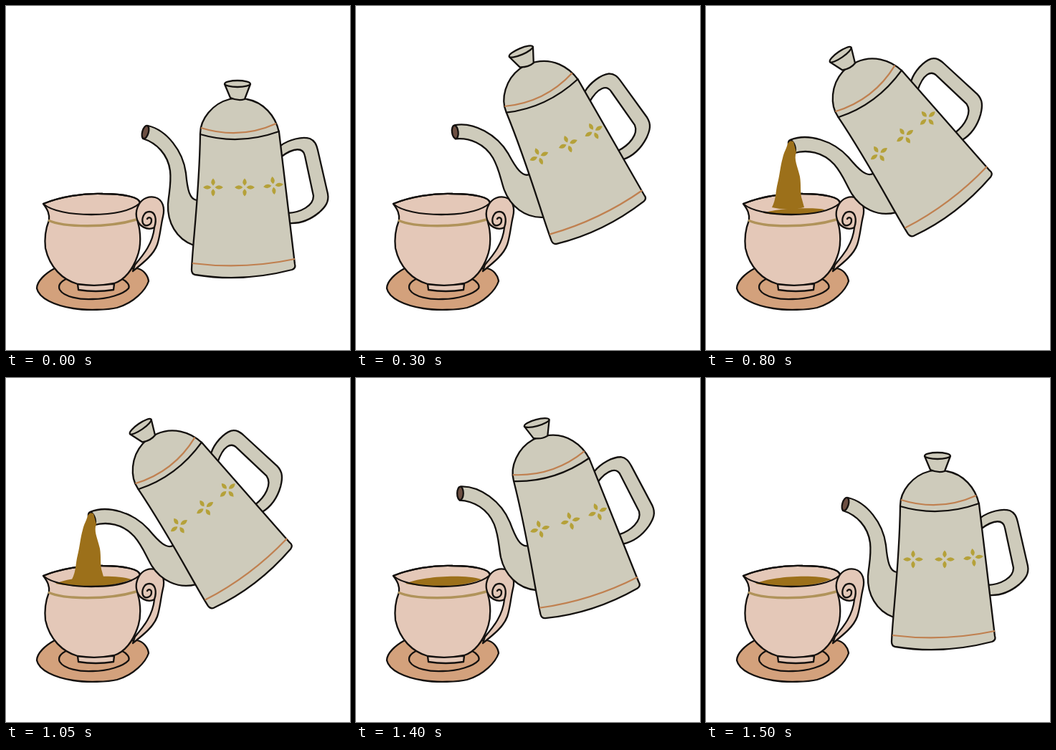
An HTML page for the animation above (2000 ms loop, 480x480 px).

```html
<!DOCTYPE html>
<html lang="en">
<head>
<meta charset="utf-8">
<title>Pouring tea</title>
<style>
  html, body { margin: 0; width: 100%; height: 100%; overflow: hidden; background: #fff; }
  svg { display: block; width: 100vw; height: 100vh; }
  .ink { stroke: #14110f; stroke-width: 2.3; stroke-linecap: round; stroke-linejoin: round; }
  .line { fill: none; }
  .pink { fill: #e4c8b8; }
  .clay { fill: #d3a17c; }
  .grey { fill: #cecbbb; }
  .trim { fill: none; stroke: #c08050; stroke-width: 2.2; }
  .tea { fill: #9c701a; }
</style>
</head>
<body>
<svg viewBox="0 0 480 480">
  <defs>
    <path id="petal" d="M2.5 0Q8 -5.5 14 0Q8 5.5 2.5 0Z"/>
    <g id="flower" fill="#b5a139">
      <use href="#petal"/>
      <use href="#petal" transform="rotate(90) scale(.9 1)"/>
      <use href="#petal" transform="rotate(180)"/>
      <use href="#petal" transform="rotate(270) scale(.9 1)"/>
    </g>
  </defs>

  <g class="ink">
    <path class="clay" d="M68 366C55 373 43 384 43 394C46 408 68 418 94 422C112 425 143 424 155 421C179 414 195 396 199 384C198 376 192 368 183 366Z"/>
    <path class="clay" d="M86 380C76 384 72 390 75 396C81 406 103 410 121 409C142 409 164 402 171 394C173 390 169 384 162 381"/>
    <path class="pink" d="M100 388L101 396Q125 400 150 396L151 388Z"/>
    <path class="pink" d="M52 276C76 266 108 261 135 262C165 262 187 267 187 275C186 287 182 292 184 302C188 315 189 335 183 350C177 367 166 382 151 387Q126 392 100 388C79 382 61 365 55 338C53 320 56 309 60 299C61 290 58 284 52 276Z"/>
  </g>
  <path fill="none" stroke="#b0935a" stroke-width="3.5" d="M59 299C80 309 142 310 182 298"/>
  <path id="surface" class="tea"/>
  <g class="ink">
    <path class="line" d="M52 276C76 266 108 261 135 262C165 262 187 267 187 275C173 287 145 291 119 291C90 291 63 286 52 276Z"/>
    <path class="pink" d="M186 276C191 268 200 265 208 267C219 270 222 282 219 294C216 306 215 322 211 333C206 347 192 358 177 370L180 361C192 347 205 331 207 309C198 314 184 308 182 294C181 288 183 281 186 276Z"/>
    <path class="line" d="M207 309C211 297 208 287 200 287C192 287 189 297 191 303C194 309 203 306 203 299C203 295 199 294 197 297"/>
  </g>

  <g id="pot">
    <g class="ink grey">
      <path d="M383 195C395 186 413 182 424 185C431 188 433 193 435 201L449 262C451 273 446 280 437 288C425 298 412 304 395 303L393 289C411 288 429 279 429 265L417 209C415 198 403 196 383 211Z"/>
      <path d="M198 167C224 173 247 202 251 233C253 255 256 272 268 271L262 334C237 325 225 301 226 277C227 262 231 248 229 230C226 207 210 191 191 185Z"/>
      <ellipse cx="194.5" cy="176" rx="4.3" ry="9.3" fill="#6d4f42" transform="rotate(16 194.5 176)"/>
      <path d="M271 178C271 158 288 136 312 130Q325 127 336 130C359 134 376 153 381 176L403 360Q405 366 399 368Q330 386 264 375Q259 374 259 368C260 335 270 260 271 178Z"/>
      <path class="line" d="M271 179Q325 195 381 175"/>
      <path d="M305 109L313 128Q324 133 333 130L341 109Z"/>
      <ellipse cx="323" cy="108.5" rx="17.8" ry="4.5"/>
    </g>
    <path class="trim" d="M272 170Q326 187 377 164M260 359Q332 368 403 353"/>
    <use href="#flower" x="289" y="253"/>
    <use href="#flower" x="333" y="253"/>
    <use href="#flower" transform="translate(373 250.5) rotate(-7)"/>
  </g>
  <path id="flow" class="tea"/>
</svg>
<script>
const LOOP = 2000;
const $ = id => document.getElementById(id);

const flows = {
  none: '',
  pour: 'M114 192Q117 187 122 189L126 204C122 214 128 224 132 238C135 250 130 262 134 272L138 289Q116 293 93 289C97 277 96 268 98 257C102 242 101 230 106 214C109 203 112 200 114 192Z',
  full: 'M114 192Q117 187 122 189L126 204C122 214 128 224 131 238C133 250 131 262 134 270L137 281Q116 287 92 281C98 270 97 258 100 247C103 235 104 222 107 212C109 203 112 200 114 192Z',
  drop: 'M132 174L139 178C139 189 135 194 136 207C137 218 132 226 125 226C117 226 113 217 116 207C119 198 130 194 132 174Z'
};

// start time, knob x, knob y, tilt, tea level, flow
const poses = [
  [0, 323, 108, 0, 0, 'none'],
  [200, 252, 62, -15, 0, 'none'],
  [300, 230, 63, -23, 0, 'none'],
  [400, 187.3, 67.3, -34.5, 0, 'none'],
  [600, 187.3, 67.3, -34.5, 0, 'pour'],
  [800, 187.3, 67.3, -34.5, 0.5, 'full'],
  [1050, 187.3, 67.3, -34.5, 1, 'full'],
  [1350, 230, 63, -23, 1, 'drop'],
  [1400, 252, 62, -15, 1, 'none'],
  [1450, 286, 70, -9, 1, 'none'],
  [1500, 323, 108, 0, 1, 'none']
];

function surface(level) {
  if (!level) return '';
  const low = 1 - level;
  return `M${69 + 24 * low} ${287 + 4 * low}C90 ${277 + 12 * low} 150 ${273 + 14 * low} ${175 - 18 * low} ${281 + 6 * low}Q150 291 119 291Q88 291 ${69 + 24 * low} ${287 + 4 * low}Z`;
}

function draw(now) {
  const time = now % LOOP;
  const [, x, y, tilt, level, flow] = poses.findLast(pose => pose[0] <= time);
  $('pot').setAttribute('transform', `translate(${x} ${y}) rotate(${tilt}) translate(-323 -108)`);
  $('surface').setAttribute('d', surface(level));
  $('flow').setAttribute('d', flows[flow]);
}

const start = performance.now();
function tick() {
  draw(performance.now() - start);
  requestAnimationFrame(tick);
}
tick();
</script>
</body>
</html>
```
